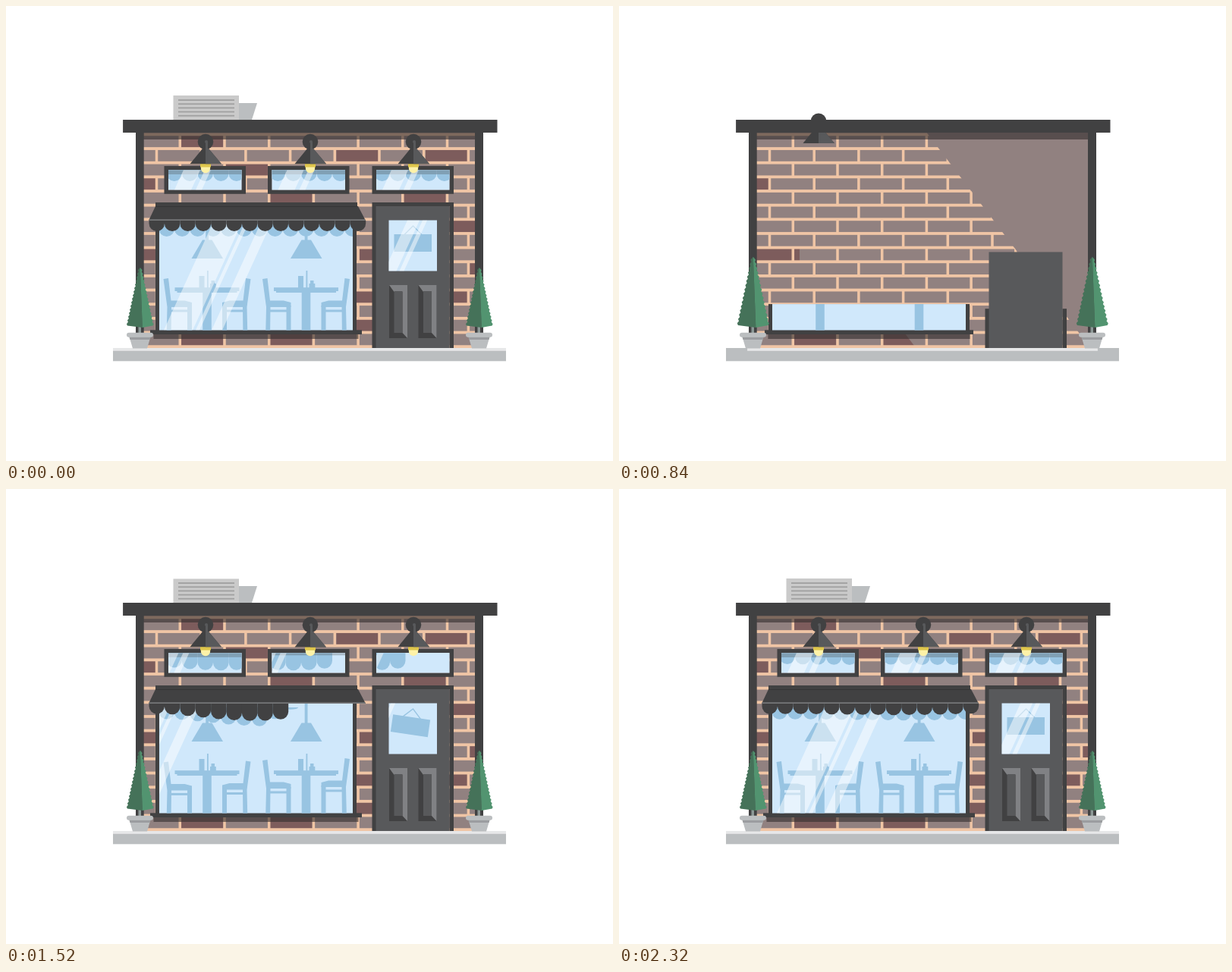
Recreate the animation shown at these times as an HTML page with a canvas. Size 800 by 600 pixels, loop 2.36 s.

```html
<!DOCTYPE html>
<html lang="en">
<head>
<meta charset="utf-8">
<title>Storefront</title>
<style>
html, body { margin: 0; width: 100%; height: 100%; overflow: hidden; background: #fff; }
canvas { display: block; }
</style>
</head>
<body>
<canvas id="stage" width="800" height="600"></canvas>
<script>
const c = document.getElementById('stage').getContext('2d');
const LOOP = 2360, STEP = 40, HOLD = 400;
const DARK = '#414142', DOOR = '#58595b', EDGE = '#808184', WALL = '#918180', MORTAR = '#f0c5a5',
  BRICK = '#7d5c5c', GLASS = '#d0e8fb', BLUE = '#98c4e2', STONE = '#bbbec0', PALE = '#e6e7e8',
  SHADE = 'rgba(50,45,45,.6)';
let t = 0;

// Timing
const part = (start, dur) => Math.min(1, Math.max(0, (t - start) / dur));
const out = (start, dur) => 1 - (1 - part(start, dur)) ** 2;
const spring = (u, tau, w) => u < 0 ? 1 : Math.exp(-u / tau) * Math.cos(w * u);

// Drawing
function box(x0, y0, x1, y1, color) {
  if (x1 <= x0 || y1 <= y0) return;
  c.fillStyle = color;
  c.fillRect(x0, y0, x1 - x0, y1 - y0);
}
function trace(pts) {
  c.beginPath();
  for (let i = 0; i < pts.length; i += 2) c.lineTo(pts[i], pts[i + 1]);
  c.closePath();
}
function poly(color, ...pts) {
  trace(pts);
  c.fillStyle = color;
  c.fill();
}
function disc(x, y, r, color) {
  c.beginPath();
  c.arc(x, y, r, 0, 7);
  c.fillStyle = color;
  c.fill();
}
function clipped(pts, draw) {
  c.save();
  trace(pts);
  c.clip();
  draw();
  c.restore();
}
const area = (x0, y0, x1, y1) => [x0, y0, x1, y0, x1, y1, x0, y1];
// Everything left of a slanted edge that passes through (x, y)
const slant = (x, y) => [-900, 0, x - y * .76, 0, x + (600 - y) * .76, 600, -900, 600];

function lobe(x, y, w, len, color) {
  const r = Math.min(w / 2, len);
  c.beginPath();
  c.moveTo(x, y);
  c.lineTo(x, y + len - r);
  c.ellipse(x + w / 2, y + len - r, w / 2, r, 0, Math.PI, 0, true);
  c.lineTo(x + w, y);
  c.fillStyle = color;
  c.fill();
}
const stretch = (age, amp) => amp * Math.exp(-age / 350) * Math.sin(.0088 * age + .55);

function glare(x0, y0, x1, y1, shift, bands) {
  const lean = (y1 - y0) * .457;
  clipped(area(x0, y0, x1, y1), () => {
    for (const [a, b] of bands) {
      const l = x0 + a + shift, r = x0 + b + shift;
      poly('rgba(255,255,255,.5)', l, y1, l + lean, y0, r + lean, y0, r, y1);
    }
  });
}
const slide = (start, dist) => -dist * (1 - part(start, 620)) ** 3;

function roofUnit() {
  const top = 118 + 35 * spring(t - 1000, 130, .0105);
  if (t < 1000) return;
  const w = out(1200, 140);
  if (w > 0) poly(STONE, 300, 128, 307 + 24 * w, 128, 307 + 17 * w, 150, 300, 150);
  box(220.5, top, 307, 151, '#cacaca');
  clipped(area(220, top, 307, 151), () => {
    for (let i = 0; i < 5; i++) {
      const y = 123.2 + 5.15 * i;
      box(227, y, 227 + 74 * out(984 + 40 * (4 - i), 270), y + 1.8, '#a0a0a0');
    }
  });
}

const darkBricks = [
  [1, 231, 286], [2, 435.5, 491], [2, 553, 608.5], [3, 289.5, 345], [4, 181, 197],
  [5, 348, 403.5], [5, 524, 579.5], [7, 582.5, 618], [9, 181, 238], [9, 465.5, 520.5],
  [10, 611.5, 618], [12, 435.5, 491], [12, 553, 608.5], [14, 435.5, 491], [15, 231, 286], [15, 348, 403.5]
];
function wall(top) {
  box(181, top, 619, 451, WALL);
  const rowY = r => 169.4 + 18.65 * r;
  const edge = -20 + 2.75 * (t - 680);
  if (t >= 680) clipped(area(181, top, 618.5, 451), () => {
    clipped(slant(edge - 230, 186), () => {
      for (const [r, a, b] of darkBricks) box(a, rowY(r - 1), b, rowY(r), BRICK);
    });
    clipped(slant(edge, 186), () => {
      for (let r = 0; r < 16; r++) {
        box(181, rowY(r) - 1.9, 619, rowY(r) + 1.9, MORTAR);
        for (let k = 0; k < 8; k++) {
          const x = (r % 2 ? 229.3 : 198.5) + 58.7 * k;
          if (r) box(x - 1.75, rowY(r - 1), x + 1.75, rowY(r), MORTAR);
        }
      }
    });
  });
  box(181, top, 618, Math.min(451, top + 9), SHADE);
}

function chair(x, flip, start) {
  c.save();
  c.translate(x, 70 * spring(t - start, 130, .0105));
  c.scale(flip, 1);
  poly(BLUE, 0, 360, 6.5, 359, 10, 388.5, 28, 388.5, 37.5, 391, 37.5, 397, 10.5, 397, 10, 440, 4, 440, 5, 397);
  box(31.5, 395, 37.5, 440, BLUE);
  box(9, 400.5, 32, 403.5, BLUE);
  c.restore();
}
function diningSet(x, k) {
  const mid = x + 42.5, w = out(980, 120), up = 25 * (1 - out(1060, 110));
  box(mid - 5.8, 373, mid + 5.8, 428, BLUE);
  if (t >= 980) {
    box(mid - 42.5 * w, 371.2, mid + 42.5 * w, 376, BLUE);
    box(mid - 39.5 * w, 375, mid + 39.5 * w, 378, BLUE);
  }
  clipped(area(x, 340, x + 85, 372), () => {
    box(mid - 10.5, 356 + up, mid - 3.5, 400, BLUE);
    box(mid, 349 + up, mid + 1.8, 400, BLUE);
    box(mid + 5.5, 362 + up, mid + 10, 400, BLUE);
    box(mid + 4, 366 + up, mid + 11.8, 400, BLUE);
  });
  chair(x - 15, 1, 1050 + 80 * k);
  chair(x + 100, -1, 1090 + 80 * k);
  const drop = -50 * (1 - out(1142 - 50 * k, 220));
  if (t >= 1000) {
    box(mid - 1.8, 270, mid + 2, 310 + drop, BLUE);
    poly(BLUE, mid - 6, 308.5 + drop, mid + 6.5, 308.5 + drop, mid + 21, 333 + drop, mid - 20.5, 333 + drop);
  }
}

function eachScallop(draw) {
  for (let i = 0; i < 14; i++) {
    const age = t - 1190 - 40 * i;
    if (age >= 0) draw(188.5 + 20.4 * i, age, 14 + stretch(age, i ? 11.7 : 4));
  }
}
function mainWindow() {
  const sill = out(529, 353);
  if (t >= 529) {
    box(329.5 - 135 * sill, 433, 329.5 + 135 * sill, 439, SHADE);
    box(329.5 - 139.5 * sill, 427.3, 329.5 + 139.5 * sill, 433, DARK);
  }
  const top = 428 - 163 * out(815, 220);
  if (top >= 428) return;
  box(197, top, 462, 428, DARK);
  box(202, top, 457, 427.5, GLASS);
  clipped(area(202, top, 457, 427.5), () => {
    diningSet(222.5, 0);
    diningSet(353, 1);
    eachScallop((x, age, len) => lobe(x + 13, 288, 20.5, (len + 2) * Math.min(1, age / 80), BLUE));
  });
  glare(202, 283, 457, 427.5, slide(1400, 180), [[6, 44], [48, 53], [69, 83]]);
}
function awning() {
  const w = out(920, 120), drop = out(1020, 120);
  if (t < 920) return;
  if (drop > 0) {
    const y = 264 + 19 * drop, s = 9 * drop;
    poly(DARK, 197, 264, 464, 264, 465 + s, y, 197 - s, y);
    if (drop === 1) box(188.5, 281.3, 473.5, 283, '#77787a');
  }
  box(330 - 133 * w, 259, 330 + 133 * w, 264.5, DARK);
  box(330 - 133 * w, 264, 330 + 133 * w, 265, '#353536');
  eachScallop((x, age, len) => lobe(x, 283, 20.5, len, DARK));
}

function topWindow(x, k) {
  const l = x + 5.5, r = x + 102, edge = x - 28 + 1.75 * (t - 1100 - 40 * k);
  const top = 243 - 27 * out(1175 + 40 * k, 110);
  if (t >= 1100) clipped(slant(edge, 211), () => {
    c.lineWidth = 5.5;
    c.strokeStyle = DARK;
    c.strokeRect(x + 2.75, 213.75, 102, 31.3);
  });
  box(l, top, r, 242.5, GLASS);
  clipped(area(l, 216.3, r, 242.5), () => {
    for (let j = 0; j < 5; j++) {
      const age = t - 1320 - 80 * k - 40 * j;
      if (age >= 0) lobe(l - 2.5 + 20.5 * j, 216, 20.5, 15 + stretch(age, 11), BLUE);
    }
    box(l, 216, r, 216 + 6 * out(1420 + 60 * k, 120), 'rgba(65,65,66,.28)');
  });
  if (top < 217) glare(l, 216.3, r, 242.5, slide(1360 + 40 * k, 70), [[8, 30], [36, 44]]);
}
function lamp(x, start, k) {
  if (t < start) return;
  c.save();
  c.translate(x, -45 * spring(t - start, 130, .015));
  const up = -14 * (1 - out(1170 + 60 * k, 120));
  if (t >= 1170 + 60 * k) {
    box(-6, 208 + up, 6, 214 + up, '#fdf2a8');
    disc(0, 214 + up, 6.2, '#fdf2a8');
    box(-7, 207 + up, 7, 212.5 + up, '#dfc64c');
  }
  disc(0, 179, 10.3, DARK);
  poly(DARK, -4, 188, 4, 188, 21, 208.3, -20.5, 208.3);
  poly(DOOR, 0, 188, 4, 188, 21, 208.3, 0, 208.3);
  box(0, 179, 3, 190, DOOR);
  disc(1, 179, 2, DOOR);
  c.restore();
}

function panel(x) {
  const s = out(1000, 130);
  if (!s) return;
  c.save();
  c.translate(x, 403);
  c.scale(s, s);
  box(-12, -35, 12, 35, DARK);
  poly(EDGE, -12, -35, 12, -35, 12, 35, 5.5, 28, 5.5, -26, -5.5, -26);
  box(-5.5, -27, 5.5, 28, DOOR);
  c.restore();
}
function door() {
  const frameTop = 451 - 192 * out(808, 220), top = 451 - 187 * out(758, 190);
  if (frameTop < 451) {
    box(482.5, frameTop, 488, 451, DARK);
    box(584.5, frameTop, 590, 451, DARK);
  }
  box(487.5, top, 584.5, 451, DOOR);
  if (t >= 1120) {
    const y = 268 - 9 * out(1170, 110);
    box(487, y, 585, y + 5 * out(1120, 60), DARK);
  }
  panel(517);
  panel(555.5);
  const g = out(980, 130);
  if (!g) return;
  box(504.5, 349.5 - 67 * g, 568, 349.5, GLASS);
  if (t >= 1160) clipped(area(504.5, 282.5, 568, 349.5), () => {
    c.save();
    c.translate(536.5, 290);
    c.rotate(-100 * Math.PI / 180 * spring(t - 1180, 211, .0126));
    c.strokeStyle = BLUE;
    c.lineWidth = 1.3;
    c.beginPath();
    c.moveTo(-12, 12);
    c.lineTo(0, 0);
    c.lineTo(12, 12);
    c.stroke();
    box(-25, 11, 24.5, 34, BLUE);
    c.restore();
  });
  glare(504.5, 282.5, 568, 349.5, slide(1400, 80), [[-6, 10], [14, 20]]);
}

function leafEdge(side) {
  const pts = [];
  for (let i = 0; i <= 32; i++) {
    const p = i / 32;
    pts.push(side * (1.5 + 16 * p + (i % 2 ? .8 : -.6)), -78 + 75.5 * p);
  }
  return pts;
}
function plant(x) {
  box(x - 2, 431 - 56 * out(520, 80), x + 1.5, 431, '#8d9997');
  const s = 1 - spring(t - 575, 161, .0105);
  if (s > 0) {
    c.save();
    c.translate(x + .3, 424);
    c.scale(s < 1 ? s ** .45 : s, s);
    poly('#457259', 0, -79, ...leafEdge(-1), 3, 0);
    poly('#529470', 0, -79, ...leafEdge(1), 3, 0);
    c.restore();
  }
  const grow = out(460, 110);
  if (!grow) return;
  c.save();
  c.translate(x, 451.5);
  c.scale(grow, grow);
  poly(STONE, -14.5, -17, 14.5, -17, 9.5, 0, -9.5, 0);
  poly('#9b9da0', -14, -15, 14, -15, 13, -11.5, -13, -11.5);
  c.beginPath();
  c.roundRect(-17.5, -20.7, 35, 6, 3);
  c.fillStyle = STONE;
  c.fill();
  c.restore();
}

function draw() {
  c.fillStyle = '#fff';
  c.fillRect(0, 0, 800, 600);
  const roof = 434 - 284 * out(480, 252), under = roof + 17;
  const roofW = 246.7 * out(440, 80), groundW = 259 * out(400, 120);
  roofUnit();
  if (t >= 480) {
    wall(under);
    box(171, under, 181.7, 451, DARK);
    box(618, under, 629, 451, DARK);
  }
  [208.5, 345, 482.5].forEach(topWindow);
  lamp(263, 800, 0);
  lamp(401, 980, 1);
  lamp(537, 1000, 2);
  if (t >= 440) box(400.8 - roofW, roof, 400.8 + roofW, under, DARK);
  mainWindow();
  awning();
  door();
  box(400 - groundW, 451, 400 + groundW, 468.3, STONE);
  const shine = 259 * out(565, 410);
  box(400 - shine, 451, 400 + shine, 454.8, PALE);
  plant(176.5);
  plant(623.5);
}

const begin = performance.now();
function frame() {
  const now = Math.floor((performance.now() - begin) % LOOP / STEP) * STEP;
  t = now < HOLD ? 1e5 : now;
  draw();
  requestAnimationFrame(frame);
}
frame();
</script>
</body>
</html>
```
